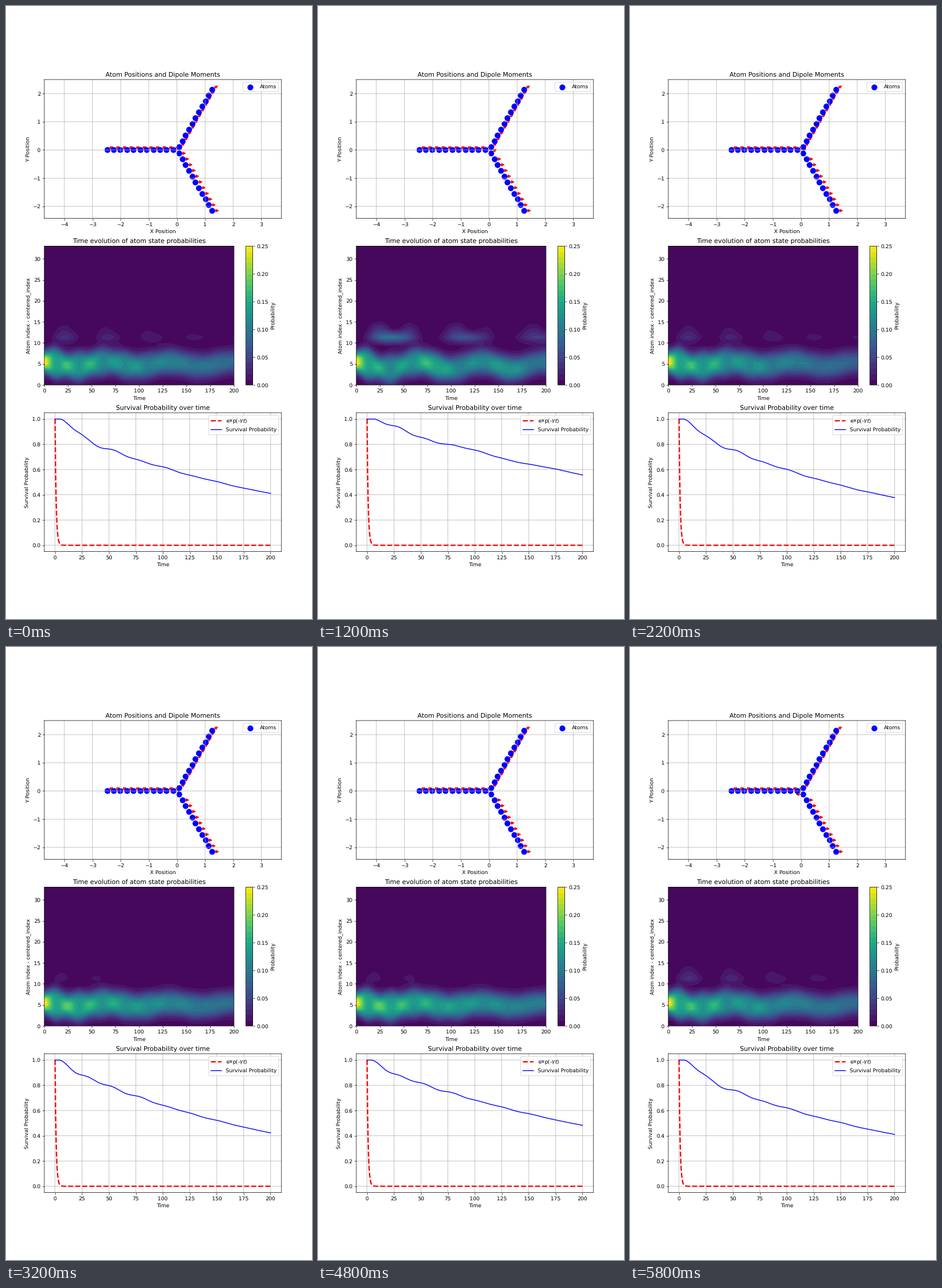
Animation of 529x1058 px, one loop 6000 ms. Source, as a matplotlib script:

```python
import numpy as np
import matplotlib.pyplot as plt
from matplotlib.animation import FuncAnimation

plt.rcParams.update({"text.hinting": "none", "path.snap": False})

FRAMES = 30
ARM = 11
STEP = 0.235
DIPOLE = 0.14

# How the chain behaves as the junction dipole turns (turn counted in frames)
TURNS = [0, 6, 11, 16, 20, 24]
DECAY = [.0041, .0029, .0046, .0042, .0035, .0035]   # steady loss rate
BURST = [.073, .004, .056, .022, .024, .030]         # loss in the first pass
COUPLING = [.35, 1, .33, .17, .16, .18]              # flow past the junction

BOUNCE = 24.4   # time between refocusings of the packet
SWAY = 66       # period of the packet centre


def by_turn(k, values):
    """Periodic cubic curve through the values; half a turn is one period."""
    period = FRAMES - 1
    xs = np.concatenate([np.array(TURNS) + s * period for s in (-1, 0, 1)])
    ys = np.tile(values, 3)
    slope = np.gradient(ys, xs)
    i = np.searchsorted(xs, k, side="right") - 1
    h = xs[i + 1] - xs[i]
    u = (k - xs[i]) / h
    return ((1 + 2 * u) * (1 - u) ** 2 * ys[i] + u * (1 - u) ** 2 * h * slope[i]
            + u * u * (3 - 2 * u) * ys[i + 1] + u * u * (u - 1) * h * slope[i + 1])


def bell(x, centre, width):
    return np.exp(-((x - centre) / width) ** 2 / 2)


time = np.linspace(0, 200, 401)
index = np.linspace(0, 33, 3 * ARM)
T, Y = np.meshgrid(time, index)


def beat(g):
    """Time for the excitation to cross the junction and come back."""
    return 28 + 50 * g


def survival(k):
    g = by_turn(k, COUPLING)
    w = 2 * np.pi / BOUNCE
    steady = time - np.sin(w * time) / w * np.exp(-time / 80)
    burst = 1 / (1 + np.exp(-(time - 10 - 48 * g) / 4))
    swing = .022 * g ** .7 * np.sin(2 * np.pi * time / beat(g)) * np.exp(-time / 150)
    loss = by_turn(k, DECAY) * steady + by_turn(k, BURST) * burst - swing
    return np.exp(-np.maximum(loss, 0))


def probability(k):
    g = by_turn(k, COUPLING)
    # pulses on the first site past the junction, with a halo further along
    pulse = .12 * g ** 1.2 * np.sin(np.pi * T / beat(g)) ** 2 * np.exp(-T / 180)
    halo = .5 * np.sin(np.pi * T / 41) ** 2 * bell(Y, 13.2, 1.1)
    leak = pulse * (bell(Y, 11.3, .85) + halo)
    # the packet spreads and refocuses while it bounces inside the arm
    wide = .5 * (1 - np.cos(2 * np.pi * time / BOUNCE)) * np.exp(-time / 90)
    spread = 1.6 + .3 * (1 - np.exp(-time / 15)) + 1.4 * wide
    power = 2.1 + 1.7 * wide
    centre = 5.15 - .5 * g + (.35 + .5 * g) * np.cos(2 * np.pi * time / SWAY)
    band = np.exp(-.5 * np.abs((Y - centre) / spread) ** power)
    band *= (survival(k) - leak.sum(axis=0)) / band.sum(axis=0)
    return np.clip(band + leak, 1e-6, .2499)


fig, (top, mid, low) = plt.subplots(3, 1, figsize=(8, 16), dpi=66.125)

# Three arms around a small triangle, each with its own dipole direction
reach = STEP / np.sqrt(3) + STEP * np.arange(ARM)
atoms, tilts = [], []
for direction, tilt in [(180, 30), (-60, 0), (60, 30)]:
    a = np.radians(direction)
    atoms += [(r * np.cos(a), r * np.sin(a)) for r in reach]
    tilts += [np.radians(tilt)] * ARM
arrows = [top.arrow(x, y, DIPOLE * np.cos(a), DIPOLE * np.sin(a),
                    head_width=.1, head_length=.1, fc="red", ec="red")
          for (x, y), a in zip(atoms, tilts)]
turning = arrows[ARM]
top.scatter(*zip(*atoms), color="blue", s=100, label="Atoms", zorder=1.2)
top.set(xlim=(-4.715, 3.712), ylim=(-2.427, 2.498), xlabel="X Position",
        ylabel="Y Position", title="Atom Positions and Dipole Moments")
top.grid(True)
top.legend(loc="upper right")

levels = np.linspace(0, .25, 26)


def draw_map(k):
    return mid.contourf(T, Y, probability(k), levels=levels, cmap="viridis")


filled = draw_map(0)
fig.colorbar(filled, ax=mid, label="Probability", ticks=np.arange(0, .26, .05))
mid.set(xlim=(0, 200), ylim=(0, 33), xlabel="Time",
        ylabel="Atom index - centered_index",
        title="Time evolution of atom state probabilities")

low.plot(time, np.exp(-time), "r--", lw=2.5, label=r"exp(-$\gamma t$)")
curve, = low.plot(time, survival(0), "b-", lw=1.5, label="Survival Probability")
low.set(xlim=(-10, 210), ylim=(-.05, 1.05), xlabel="Time",
        ylabel="Survival Probability", title="Survival Probability over time")
low.grid(True)
low.legend(loc="upper right")


def update(k):
    global filled
    angle = np.pi * k / (FRAMES - 1)
    turning.set_data(dx=DIPOLE * np.cos(angle), dy=DIPOLE * np.sin(angle))
    filled.remove()
    filled = draw_map(k)
    curve.set_ydata(survival(k))
    return turning, curve


anim = FuncAnimation(fig, update, frames=FRAMES, interval=200, repeat=True,
                     repeat_delay=0, blit=False)
plt.show()
```
